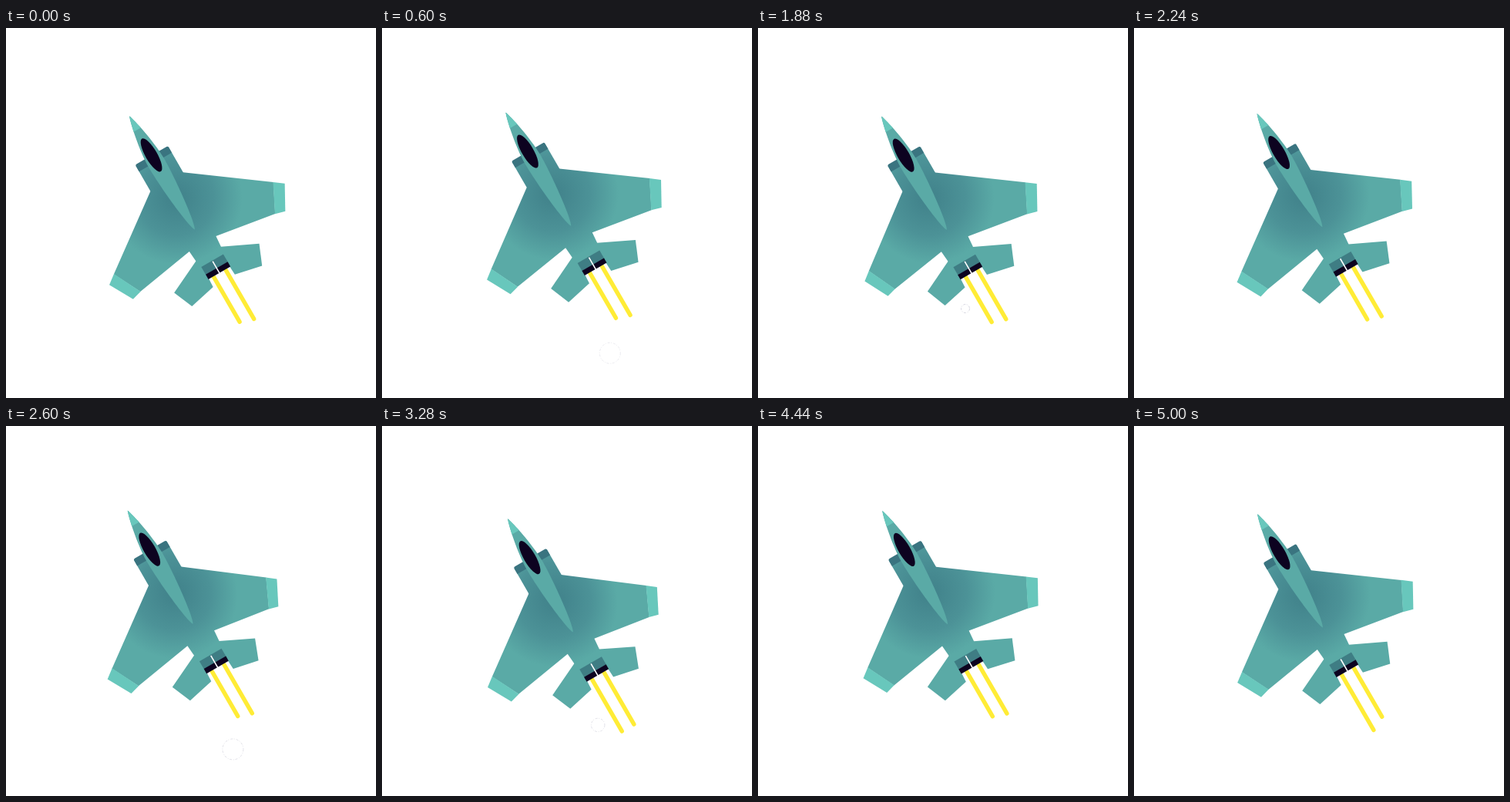
Animation, 480 px wide and 480 px high, one loop 5040 ms. Source, as an HTML page with a canvas:

```html
<!DOCTYPE html>
<html lang="en">
<head>
<meta charset="utf-8">
<title>Jet</title>
<style>
html, body { margin: 0; width: 100%; height: 100%; overflow: hidden; background: #fff; }
canvas { display: block; width: 100vmin; height: 100vmin; }
</style>
</head>
<body>
<canvas id="stage" width="480" height="480"></canvas>
<script>
const ctx = document.getElementById('stage').getContext('2d');
const LOOP = 5040, STEP = 40;
const TEAL = '#5aaaa6', TIP = '#68c7bc', DARK = '#3a7480', ENGINE = '#3f7d84';
const INK = '#0d0320', YELLOW = '#ffec36';

// Evenly spaced points of the hovering path
const driftX = [0, 0, 8, 1, -0.5, -2.5, 3.7, 5, 1];
const driftY = [0, -5, 2.5, 2, -3.3, -4, 6.3, -3.4, -4.3];

// Closed Catmull-Rom curve through the points
function follow(points, t) {
  const n = points.length, pos = t / LOOP * n, i = Math.floor(pos), s = pos - i;
  const [a, b, c, d] = [-1, 0, 1, 2].map(k => points[(i + k + n) % n]);
  return b + s / 2 * (c - a + s * (2 * a - 5 * b + 4 * c - d + s * (3 * (b - c) + d - a)));
}

// Positive roll shortens the right wing, negative the left
function rollAt(t) {
  const a = t / LOOP * 2 * Math.PI;
  const roll = 4 * Math.sin(2 * a) - 6.2 * Math.sin(a) + 3.3 * (Math.cos(2 * a) - Math.cos(a));
  return Math.max(-9.5, Math.min(7.5, roll));
}

function poly(color, points) {
  ctx.beginPath();
  points.forEach(([x, y]) => ctx.lineTo(x, y));
  ctx.closePath();
  ctx.fillStyle = color;
  ctx.fill();
}

function rect(color, x, y, w, h) {
  ctx.fillStyle = color;
  ctx.fillRect(x, y, w, h);
}

function line(color, width, x, from, to) {
  ctx.beginPath();
  ctx.moveTo(x, from);
  ctx.lineTo(x, to);
  ctx.strokeStyle = color;
  ctx.lineWidth = width;
  ctx.lineCap = 'round';
  ctx.stroke();
}

function shade() {
  const g = ctx.createRadialGradient(0, 122, 12, 0, 122, 86);
  g.addColorStop(0, '#43858d');
  g.addColorStop(0.5, '#4c9297');
  g.addColorStop(1, TEAL);
  return g;
}

function side(dir, roll) {
  const root = 20, k = Math.max(0, roll) / 111;
  ctx.save();
  ctx.scale(dir, 1);
  ctx.transform(1 - k, -0.35 * k, 0, 1, root * k, 0.35 * root * k);
  poly(shade(), [[10, 89], [24.5, 98], [119.5, 167.5], [101, 204.3], [20, 191], [10, 191]]);
  poly(TIP, [[119.2, 167.3], [131.4, 176.5], [114, 208], [100.7, 204.3]]);
  poly(TEAL, [[14, 204], [18.6, 206], [63.7, 227.5], [52.5, 254.3], [16.3, 246.3]]);
  ctx.restore();
}

function body() {
  const half = [[24.5, 60], [24.5, 100], [20, 191], [17, 228]];
  poly(shade(), [...half, ...half.map(([x, y]) => [-x, y]).reverse()]);
  ctx.beginPath();
  ctx.roundRect(-24.5, 58.5, 49, 10, [2, 2, 0, 0]);
  ctx.fillStyle = DARK;
  ctx.fill();
  rect(ENGINE, -16.5, 216, 33, 12);
  rect(INK, -16.5, 227.5, 33, 7);
  rect('#fff', -0.8, 217, 1.6, 18);
}

function spine() {
  ctx.save();
  ctx.translate(0.5, 0);
  ctx.beginPath();
  for (const dir of [-1, 1]) {
    ctx.moveTo(0, 0);
    ctx.bezierCurveTo(dir * 3.5, 9, dir * 11, 44, dir * 11.5, 69);
    ctx.bezierCurveTo(dir * 11.5, 100, dir * 5, 163, 0, 170);
  }
  ctx.clip();
  rect(TEAL, -20, 0, 40, 175);
  rect(TIP, -20, 0, 40, 20.5);
  ctx.restore();
  ctx.beginPath();
  ctx.ellipse(0, 58, 7.6, 24.5, 0, 0, 7);
  ctx.fillStyle = INK;
  ctx.fill();
}

function flames(t) {
  const burst = Math.max(0, (t / STEP) % 21 - 17) / 3;
  line(YELLOW, 5.5, -9, 233, 302.5 + 15.5 * burst);
  line(YELLOW, 5.5, 9, 233, 308.5 + 5 * Math.sin(Math.PI * burst));
}

function wind(t) {
  const dt = t - 3880;
  if (Math.abs(dt) > 80) return;
  for (const x of [-71, -94]) {
    const head = 94 - 0.63 * x + dt * 0.3;
    line('#fff', 4, x, head - 24, head);
  }
}

function jet(t) {
  const roll = rollAt(t);
  ctx.save();
  ctx.translate(159.6 + follow(driftX, t), 114.6 + follow(driftY, t));
  ctx.rotate(-Math.PI / 6);
  flames(t);
  side(-1, -roll);
  side(1, roll);
  body();
  spine();
  wind(t);
  ctx.restore();
}

// Faint smoke rings, shrinking in groups of three
function puffs(t) {
  for (let k = 0; k < 7; k++) {
    const dt = t - 520 - k * 680;
    if (Math.abs(dt) > 120) continue;
    const size = (1 - k % 3 / 2) ** 1.3;
    ctx.beginPath();
    ctx.arc(269 + 24 * size + dt * 0.035, 364 + 53 * size + dt * 0.06, 5.5 + 8 * size, 0, 7);
    ctx.setLineDash([3, 1.5, 1, 2]);
    ctx.lineWidth = 1;
    ctx.strokeStyle = `rgba(215, 215, 225, ${1 - Math.abs(dt) / 160})`;
    ctx.stroke();
    ctx.setLineDash([]);
  }
}

function draw(now) {
  const t = Math.floor((now % LOOP) / STEP) * STEP;
  rect('#fff', 0, 0, 480, 480);
  puffs(t);
  jet(t);
}

const start = performance.now();
function tick() {
  draw(performance.now() - start);
  requestAnimationFrame(tick);
}
tick();
</script>
</body>
</html>
```
